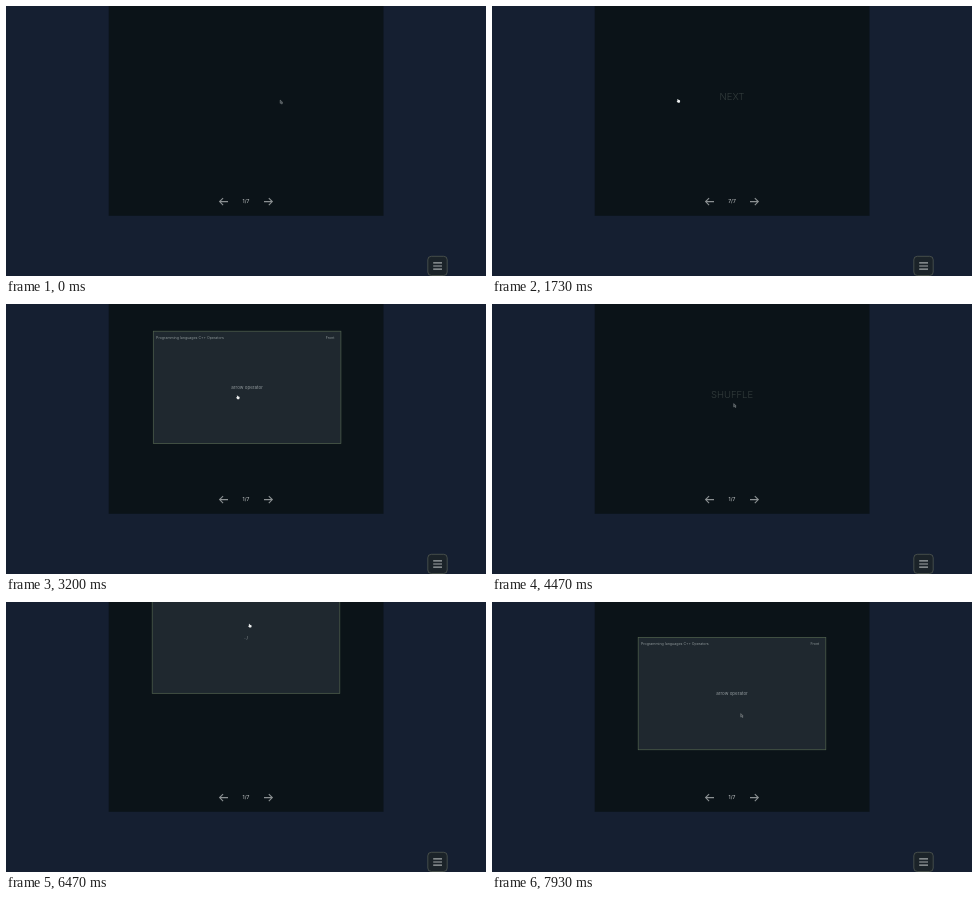
Animation of 480 by 270 pixels, one loop 8000 ms. Source, as an HTML page:

```html
<!DOCTYPE html>
<html lang="en">
<head>
<meta charset="utf-8">
<title>Flash cards</title>
<style>
  html, body { margin: 0; width: 100%; height: 100%; overflow: hidden; background: #151f31; }
  svg { display: block; width: 100vw; height: 100vh; }
  text { font-family: Inter, "Noto Sans", sans-serif; fill: #939b9e; }
  .label { font-size: 3.6px; fill: #8a9395; }
  .face { font-size: 4.5px; text-anchor: middle; }
  .count { font-size: 5px; font-weight: 500; text-anchor: middle; fill: #b4b8b9; }
  .action { font-size: 9.5px; font-weight: 300; text-anchor: middle; fill: #343d3d; }
  .icon { fill: none; stroke: #8b9092; stroke-width: 1.1; }
  .bars { stroke: #a3a8a9; stroke-width: 1.2; }
</style>
</head>
<body>
<svg viewBox="0 0 480 270">
  <rect width="480" height="270" fill="#151f31"/>
  <rect x="102.7" width="274.8" height="209.8" fill="#0b1318"/>
  <path class="icon" d="M222 195.6H213.6M217.1 192.1L213.6 195.6L217.1 199.1"/>
  <path class="icon" d="M258 195.6H266.3M262.8 192.1L266.3 195.6L262.8 199.1"/>
  <text class="count" id="count" x="240" y="197.4"></text>
  <text class="action" id="action" x="240" y="94"></text>
  <g id="card">
    <rect id="frame" x="146.2" y="27.2" width="187.6" height="112.4" fill="#1f282f" stroke-width=".7"/>
    <text class="label" id="title" x="149" y="34.7"></text>
    <text class="label" x="327.3" y="34.7" text-anchor="end">Front</text>
    <text class="face" id="face" x="240" y="85.2"></text>
  </g>
  <rect x="421.8" y="250.3" width="19.4" height="19.2" rx="3.5" fill="#1b2329" stroke="#596058" stroke-width=".7"/>
  <path class="icon bars" d="M427.2 256.8h8.8M427.2 260h8.8M427.2 263.2h8.8"/>
  <g id="cursor">
    <path id="arrow" d="M-1.3 -1.9V1.4L-.6 .8L.2 2.1L.9 1.7L.2 .5L1.2 .4Z" fill="#3a4246" stroke="#8b9193" stroke-width=".5"/>
    <path id="hand" d="M-1.2 -2Q-.5 -2.4 -.1 -1.2L1.3 -.7Q1.8 -.3 1.6 .5L1.1 1.7H-.6L-1.8 .3Q-1.7 -.4 -.9 -.4Z" fill="#eef0f0"/>
  </g>
</svg>
<script>
const LOOP = 8000, STEP = 1000 / 15;
const $ = id => document.getElementById(id);

const operators = { title: "Programming languages C++ Operators", face: "arrow operator", border: "#52634f" };
const react = { title: "Web development React js General", face: "../", border: "#59686f" };
const reactShuffled = { ...react, border: "#52634f" };

// A card glides in from one vector, is grabbed, then swiped away along another.
const visits = [
  { card: react, start: 60, from: [-600, 0], grab: 1340, end: 1690, swipe: [-300, 0], action: "NEXT" },
  { card: operators, start: 2600, from: [600, 0], grab: 3720, end: 4110, swipe: [5, 135], action: "SHUFFLE" },
  { card: reactShuffled, start: 5140, from: [0, -270], grab: 6200, end: 6650, swipe: [0, -232], action: "RETURN" },
  { card: operators, start: 7600, from: [0, 270], grab: LOOP, end: LOOP + 1, swipe: [0, 0], action: "" }
];
const ACTION_TIME = 820;

const pointerStart = [275.5, 96];
const pointerMoves = [
  { start: 90, end: 1000, to: [293.5, 98.5] },
  { start: 1340, end: 1730, to: [186.5, 95] },
  { start: 2600, end: 3200, to: [232, 93.5] },
  { start: 3720, end: 4130, to: [246, 227.5] },
  { start: 4200, end: 4467, to: [243, 101.5] },
  { start: 5140, end: 5930, to: [244, 75] },
  { start: 6200, end: 6600, to: [244, 6] },
  { start: 6600, end: 6867, to: [250, 113.5] }
];

const within = (t, a, b) => t >= a && t < b;
const progress = (t, a, b) => Math.min(1, Math.max(0, (t - a) / (b - a)));
const smooth = k => k * k * (3 - 2 * k);

const pointerAt = t => pointerMoves.reduce((at, { start, end, to }) => {
  const k = smooth(progress(t, start, end));
  return at.map((v, i) => v + (to[i] - v) * k);
}, pointerStart);

function cardOffset({ start, from, grab, end, swipe }, t) {
  const remaining = Math.exp(-(t - start) * 0.0105);
  const dragged = progress(t, grab, end) ** 3;
  return from.map((v, i) => v * remaining + swipe[i] * dragged);
}

const move = (id, [x, y]) => $(id).setAttribute("transform", `translate(${x.toFixed(2)} ${y.toFixed(2)})`);
const show = (id, on) => $(id).setAttribute("visibility", on ? "visible" : "hidden");
const write = (id, text) => { if ($(id).textContent !== text) $(id).textContent = text; };

function render(t) {
  const visit = visits.find(v => within(t, v.start + 40, v.end));
  show("card", visit);
  if (visit) {
    move("card", cardOffset(visit, t));
    write("title", visit.card.title);
    write("face", visit.card.face);
    $("frame").setAttribute("stroke", visit.card.border);
  }

  const done = visits.find(v => within(t, v.end, v.end + ACTION_TIME));
  write("action", done ? done.action : "");
  write("count", within(t, 120, 2650) ? "7/7" : "1/7");

  const hand = within(t, 450, 4230) || within(t, 5500, 6700);
  show("hand", hand);
  show("arrow", !hand);
  move("cursor", pointerAt(t));
}

const origin = performance.now();
function tick() {
  const t = (performance.now() - origin) % LOOP;
  render(Math.floor((t + 4) / STEP) * STEP % LOOP);
  requestAnimationFrame(tick);
}
tick();
</script>
</body>
</html>
```
